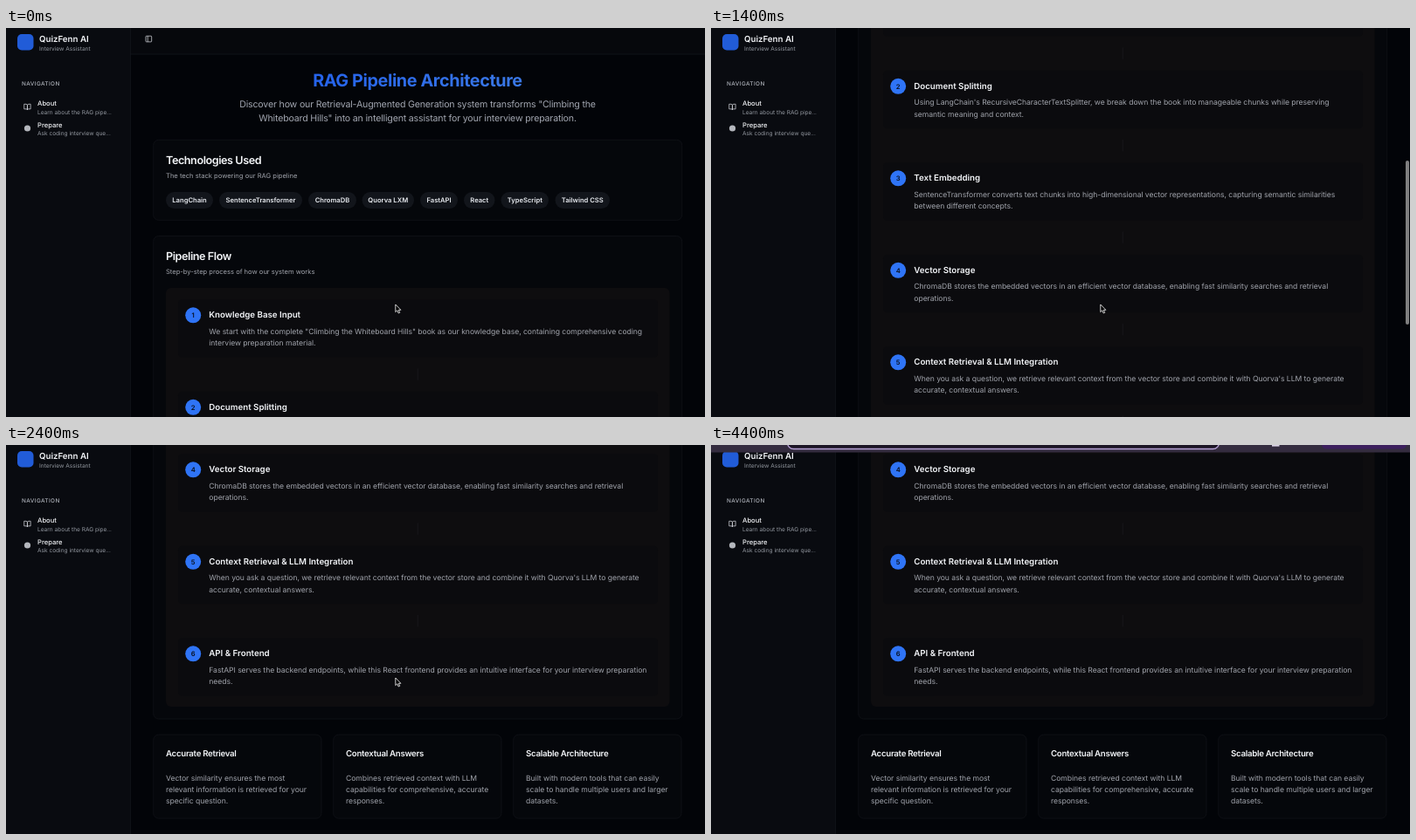
An HTML page for the animation above (4500 ms loop, 800x446 px).

```html
<!DOCTYPE html>
<html lang="en">
<head>
<meta charset="utf-8">
<title>RAG Pipeline Architecture</title>
<style>
html, body { margin: 0; width: 100%; height: 100%; overflow: hidden; background: #020408; }
svg { display: block; }
text { font-family: Inter, sans-serif; font-optical-sizing: none; text-rendering: geometricPrecision; fill: #f3f5f8; }
.title { font-size: 19.8px; font-weight: 700; letter-spacing: -.02em; fill: url(#blue); text-anchor: middle; }
.lead { font-size: 10.61px; letter-spacing: -.017em; fill: #a2a6b0; text-anchor: middle; }
.section { font-size: 12.6px; font-weight: 600; letter-spacing: -.034em; }
.card-title { font-size: 9.67px; font-weight: 600; letter-spacing: -.0295em; }
.step-title { font-size: 9.72px; font-weight: 600; letter-spacing: -.001em; }
.body { font-size: 8.6px; letter-spacing: -.005em; fill: #a0a3ab; }
.note { font-size: 7.58px; fill: #a0a3ab; }
.badge, .num { font-size: 7.61px; font-weight: 600; text-anchor: middle; fill: #e8ebf0; }
.num { fill: #08101f; }
.item { font-size: 7.61px; font-weight: 500; }
.small { font-size: 6.55px; fill: #92979f; }
.label { font-size: 6.4px; font-weight: 500; letter-spacing: .067em; fill: #adb1b9; }
.icon { fill: none; stroke: #d5d8de; stroke-width: 2; stroke-linejoin: round; }
.card { fill: #05070b; stroke: #13151b; stroke-width: .7; }
</style>
</head>
<body>
<svg id="stage" width="800" height="446" viewBox="0 0 800 446"></svg>
<script>
const LOOP = 4500, FRAME = 100, MAX_SCROLL = 617.5;

const text = (x, y, cls, str) => `<text x="${x}" y="${y}" class="${cls}">${str}</text>`;
const lines = (x, y, gap, cls, list) => list.map((s, i) => text(x, y + i * gap, cls, s)).join('');
const rect = (x, y, w, h, r, attrs) =>
  `<rect x="${x}" y="${y}" width="${w}" height="${h}" rx="${r}" ${attrs}/>`;
const icon = (x, y, d) => `<path class="icon" transform="translate(${x} ${y}) scale(.37)" d="${d}"/>`;

const badges = [
  ['LangChain', 183, 54], ['SentenceTransformer', 244, 95], ['ChromaDB', 346, 55],
  ['Quorva LXM', 407.5, 59.5], ['FastAPI', 474, 43], ['React', 524, 35.5],
  ['TypeScript', 566.5, 54.5], ['Tailwind CSS', 628.5, 62.5]
];

const steps = [
  ['Knowledge Base Input',
    'We start with the complete "Climbing the Whiteboard Hills" book as our knowledge base, containing comprehensive coding',
    'interview preparation material.'],
  ['Document Splitting',
    "Using LangChain's RecursiveCharacterTextSplitter, we break down the book into manageable chunks while preserving",
    'semantic meaning and context.'],
  ['Text Embedding',
    'SentenceTransformer converts text chunks into high-dimensional vector representations, capturing semantic similarities',
    'between different concepts.'],
  ['Vector Storage',
    'ChromaDB stores the embedded vectors in an efficient vector database, enabling fast similarity searches and retrieval',
    'operations.'],
  ['Context Retrieval &amp; LLM Integration',
    "When you ask a question, we retrieve relevant context from the vector store and combine it with Quorva's LLM to generate",
    'accurate, contextual answers.'],
  ['API &amp; Frontend',
    'FastAPI serves the backend endpoints, while this React frontend provides an intuitive interface for your interview preparation',
    'needs.']
];

const features = [
  ['Accurate Retrieval', 'Vector similarity ensures the most',
    'relevant information is retrieved for your', 'specific question.'],
  ['Contextual Answers', 'Combines retrieved context with LLM',
    'capabilities for comprehensive, accurate', 'responses.'],
  ['Scalable Architecture', 'Built with modern tools that can easily',
    'scale to handle multiple users and larger', 'datasets.']
];

const badge = ([name, x, w]) =>
  rect(x, 188, w, 18.9, 9.45, 'fill="#12151b"') + text(x + w / 2, 200.1, 'badge', name);

const step = ([name, ...body], i) => `<g transform="translate(0 ${i * 105.5})">
  ${rect(197, 311.3, 549, 66.4, 4.4, 'fill="#0b0b0e"')}
  <circle cx="214.2" cy="329.3" r="9" fill="#2f74f6"/>
  ${text(214.2, 332, 'num', i + 1)}
  ${text(232.3, 332, 'step-title', name)}
  ${lines(232.3, 350.7, 13.33, 'body', body)}
  ${i < 5 ? rect(470.8, 390.5, .7, 13.3, 0, 'fill="#1c1d21"') : ''}</g>`;

const feature = ([name, ...body], i) => `<g transform="translate(${i * 206} 0)">
  ${rect(168.7, 949.6, 192.3, 96, 6, 'class="card"')}
  ${text(183, 974.3, 'card-title', name)}
  ${lines(183, 1002, 13.33, 'body', body)}</g>`;

const page = `<g id="page">
  ${rect(142, 0, 658, 30, 0, 'fill="#06080c"')}
  ${rect(142, 29.7, 658, .7, 0, 'fill="#15181e"')}
  ${icon(158.9, 8.1, 'M5 3h14a2 2 0 0 1 2 2v14a2 2 0 0 1-2 2H5a2 2 0 0 1-2-2V5a2 2 0 0 1 2-2zM9 3v18')}
  ${text(471, 66.7, 'title', 'RAG Pipeline Architecture')}
  ${lines(471, 91.3, 15.56, 'lead', [
    'Discover how our Retrieval-Augmented Generation system transforms "Climbing the',
    'Whiteboard Hills" into an intelligent assistant for your interview preparation.'])}
  ${rect(168.7, 128.3, 605, 92, 6, 'class="card"')}
  ${text(183, 156.4, 'section', 'Technologies Used')}
  ${text(183, 171.6, 'note', 'The tech stack powering our RAG pipeline')}
  ${badges.map(badge).join('')}
  ${rect(168.7, 238.5, 605, 693, 6, 'class="card"')}
  ${text(183, 266.4, 'section', 'Pipeline Flow')}
  ${text(183, 281.6, 'note', 'Step-by-step process of how our system works')}
  ${rect(183, 298, 576.5, 619.5, 6, 'fill="#0e0d0f"')}
  ${steps.map(step).join('')}
  ${features.map(feature).join('')}</g>`;

const sidebar = rect(0, 0, 142, 446, 0, 'fill="#090b10"') +
  rect(142, 0, .7, 446, 0, 'fill="#15181e"') +
  rect(13, 7, 18.5, 18.5, 5, 'fill="#215cd8"') +
  text(38, 15.5, 'step-title', 'QuizFenn AI') +
  text(38, 26.3, 'small', 'Interview Assistant') +
  text(18, 66.2, 'label', 'NAVIGATION') +
  icon(20, 86.2, 'M2 3h6a4 4 0 0 1 4 4v14a3 3 0 0 0-3-3H2zM22 3h-6a4 4 0 0 0-4 4v14a3 3 0 0 1 3-3h7z') +
  text(36, 89, 'item', 'About') +
  text(36, 98.8, 'small', 'Learn about the RAG pipe...') +
  '<circle cx="24.5" cy="115" r="3.6" fill="#b4b7bd"/>' +
  text(36, 113.5, 'item', 'Prepare') +
  text(36, 123, 'small', 'Ask coding interview que...');

const browserBar = `<g id="bar">
  ${rect(0, -12, 800, 20.5, 0, 'fill="#342c3f"')}
  ${rect(87.5, -16, 494, 20.5, 7, 'fill="#1b1424" stroke="#b7a2d6" stroke-width="1.3"')}
  ${rect(642, -1, 8.5, 2.6, 0, 'fill="#d9d2e4"')}
  ${rect(699, -14, 97, 18.5, 5, 'fill="#3d1f5e"')}</g>`;

const cursor = `<path id="cursor" fill="#000" stroke="#fff" stroke-width=".8" stroke-linejoin="round"
  d="M0 0v8.6l2-1.8 1.4 3.2 1.5-.7-1.4-3h2.6z"/>`;

const stage = document.getElementById('stage');
stage.innerHTML = `<defs><linearGradient id="blue">
  <stop stop-color="#2563eb"/><stop offset="1" stop-color="#3a78e6"/></linearGradient></defs>
  ${page}${sidebar}${rect(795, 0, 4, 188, 2, 'id="thumb" fill="#808080"')}${cursor}${browserBar}`;

// Linear interpolation through [time, value] points
function track(points, t) {
  const i = points.findIndex(p => p[0] > t);
  if (i === 0) return points[0][1];
  if (i < 0) return points[points.length - 1][1];
  const [t0, a] = points[i - 1], [t1, b] = points[i];
  return a + (b - a) * (t - t0) / (t1 - t0);
}

// Two flicks, then the rubber band settles back
const scrollPath = [[600, 0], [700, 40], [800, 120], [900, 198], [1000, 254], [1200, 328], [1300, 348],
  [1400, 368], [1500, 440], [1600, 545], [1700, 622], [1800, 641], [1900, 639], [2100, 626], [2400, MAX_SCROLL]];
const cursorPath = [[2200, 317], [2300, 302], [2400, 267], [2800, -14]];
const thumbFade = [[600, 0], [700, 1], [2100, 1], [2400, 0]];
const barPath = [[2700, -10], [3000, 0]];

const [pageEl, thumb, pointer, bar] = ['page', 'thumb', 'cursor', 'bar'].map(id => document.getElementById(id));
const move = (el, x, y) => el.setAttribute('transform', `translate(${x} ${y})`);

function draw(now) {
  const t = Math.floor(now % LOOP / FRAME) * FRAME;
  const scroll = track(scrollPath, t);
  move(pageEl, 0, -scroll);
  move(thumb, 0, Math.min(scroll, MAX_SCROLL) * .421 - 3);
  thumb.setAttribute('opacity', track(thumbFade, t));
  move(pointer, 445.8, track(cursorPath, t));
  move(bar, 0, track(barPath, t));
}

const start = performance.now();
function tick() {
  draw(performance.now() - start);
  requestAnimationFrame(tick);
}
tick();
</script>
</body>
</html>
```
